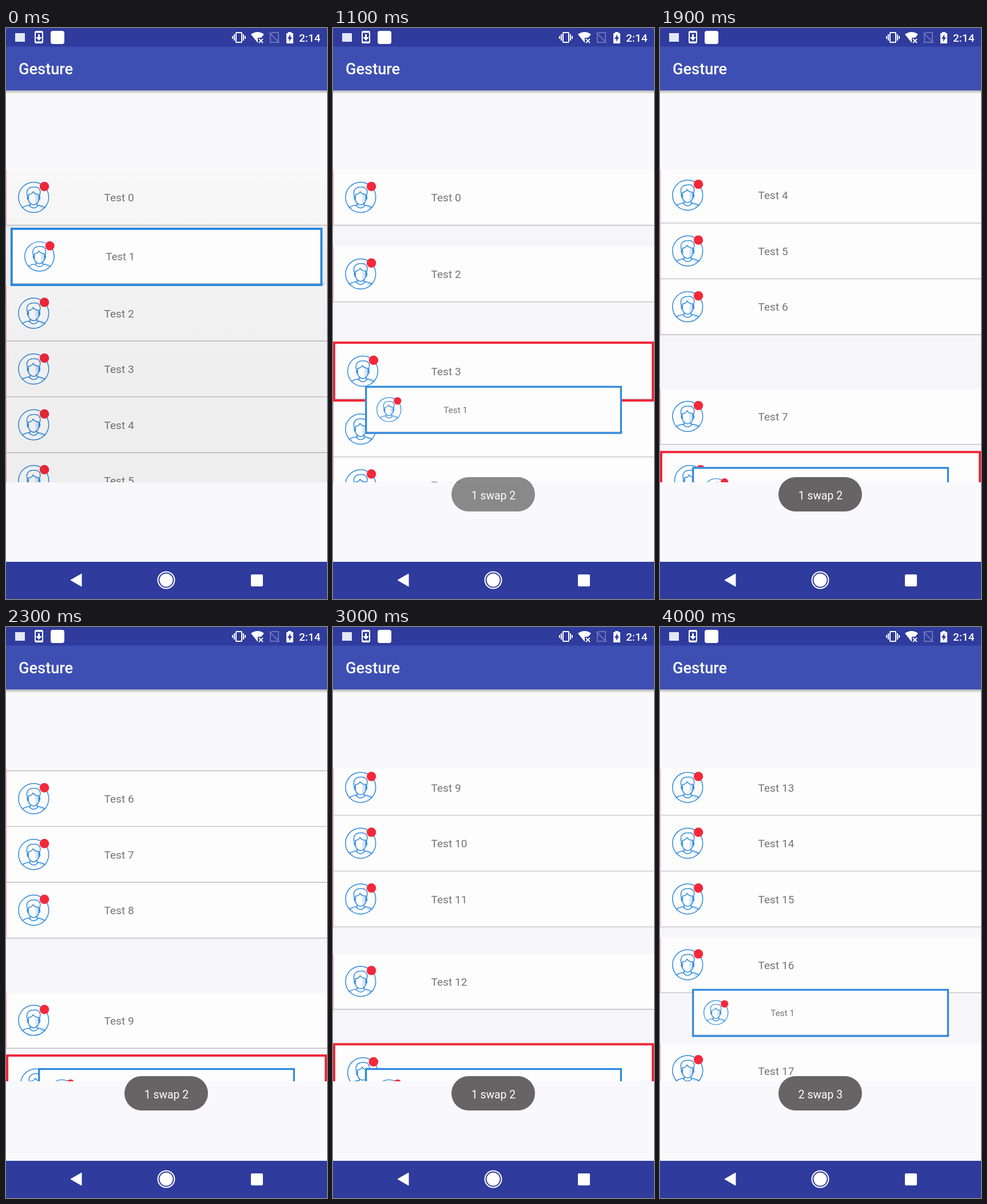
An HTML page that plays this animation: 561x998 px, repeating every 4100 ms.

```html
<!DOCTYPE html>
<html lang="en">
<head>
<meta charset="utf-8">
<title>Drag to reorder</title>
<style>
  html, body { margin: 0; height: 100%; overflow: hidden; }
  svg { display: block; width: 561px; height: 998px; background: #f9f8fa; }
  text { font: 19.1px Roboto, sans-serif; }
  .title { font-size: 27.2px; font-weight: 500; fill: #fff; }
  .clock { font-weight: 500; fill: #fff; }
  .label { fill: #757575; }
  .bg { fill: #fdfdfe; width: 561px; height: 97.5px; }
  .frame { fill: none; stroke: #f1283a; stroke-width: 4px; visibility: hidden; }
  .hot .bg { height: 105px; }
  .hot .frame { visibility: visible; }
  .hot .edge { visibility: hidden; }
  .hot .body { transform: translate(3.75px, 3.75px); }
  .hot .label { transform: translateY(3.75px); }
  #drag .frame { stroke: #2b87dd; }
</style>
</head>
<body>
<svg viewBox="0 0 561 998">
  <defs>
    <clipPath id="view"><path d="M0 248H561V794H0z"/></clipPath>
    <linearGradient id="drop" x2="0" y2="1">
      <stop stop-color="#000" stop-opacity=".3"/>
      <stop offset="1" stop-color="#000" stop-opacity="0"/>
    </linearGradient>
    <linearGradient id="dim" x2="0" y2="1">
      <stop stop-opacity=".02"/>
      <stop offset=".6" stop-opacity=".055"/>
      <stop offset="1" stop-opacity=".06"/>
    </linearGradient>
    <g id="avatar">
      <g fill="none" stroke="#2f89dc" stroke-width="1.5" stroke-linecap="round" stroke-linejoin="round">
        <path d="M9 14Q17 15 20 18L15 22Q11 19 9 14zM3-4H8V5Q7 10 3 12z" fill="#d3e6fa" stroke="none"/>
        <circle r="26.4"/>
        <path d="M-10 1C-12-4-13-10-10-14-7-18-3-18 0-18 9-19 13-13 11-6L10 1"/>
        <path d="M-9-5Q-3-5-1-10 2-5 9-5V4C9 9 4 13 0 13S-9 9-9 4z"/>
        <path d="M-9-1q-3 0-2 3t2 3M9-1q3 0 2 3t-2 3"/>
        <path d="M-20 18Q-14 14-6 13.5V10M20 18Q14 14 6 13.5V10M-8 14Q0 23 8 14"/>
      </g>
      <circle cx="18.8" cy="-19" r="8.2" fill="#f4283a"/>
    </g>
  </defs>

  <g clip-path="url(#view)">
    <path d="M0 248H561V794H0z" fill="#f6f6f8"/>
    <g id="rows"></g>
    <path id="shade" d="M0 248H561V794H0z" fill="url(#dim)"/>
    <g id="drag"></g>
  </g>

  <path d="M0 109H561V115H0z" fill="url(#drop)"/>
  <path d="M0 32H561V109H0z" fill="#3e4fb3"/>
  <path d="M0 0H561V32.500H0zM0 933H561V998H0z" fill="#2f3b9d"/>
  <text class="title" x="22" y="81">Gesture</text>
  <text class="clock" x="512" y="24">2:14</text>

  <g fill="#fff">
    <rect x="16" y="9" width="17" height="15" fill="#e4e7f5"/>
    <rect x="78" y="5" width="24" height="23" rx="4"/>
    <path d="M56 11h3v5h4l-5.500 6-5.500-6h4z"/>
    <path d="M428 11Q440 3 451 11L446 17H440V26z"/>
    <path d="M442 19l7 7m0-7l-7 7" stroke="#fff" stroke-width="1.800"/>
    <path d="M493 7h6v2h3v18h-12V9h3z"/>
    <path d="M497 11l-5 8h3v5l5-8h-3z" fill="#2f3b9d"/>
    <path d="M113 965L132 954V976z" stroke="#fff" stroke-linejoin="round"/>
    <circle cx="280" cy="965" r="11.500"/>
    <rect x="428" y="955" width="21" height="21" rx="2"/>
  </g>
  <g fill="none" stroke="#fff" stroke-width="2">
    <rect x="51" y="6" width="13" height="20" rx="2"/>
    <path d="M51 7.500H64M51 24.500H64"/>
    <rect x="402" y="8" width="10" height="17" rx="1"/>
    <path d="M399 11V22M415 11V22M396 14V19M418 14V19"/>
    <path d="M465 8H476V25H462V12zM460 8L478 26" stroke="#6973b8"/>
    <circle cx="280" cy="965" r="14.500"/>
  </g>

  <g id="toast">
    <rect x="207" y="785" width="146" height="60" rx="30" fill="#666465"/>
    <text id="note" x="280.500" y="823.500" text-anchor="middle" fill="#fff" style="font-size:19.4px"></text>
  </g>
</svg>
<script>
const LOOP = 4100, STEP = 100, MOVE = 250;
const TOP = 248, PITCH = 97.5, PAD = 7.5, COUNT = 20;
const $ = id => document.getElementById(id);

// [input, value] pairs, linear in between
const centerPath = [[0, 400], [200, 402], [700, 478], [950, 600], [1150, 690], [1335, 762],
  [1500, 805.5], [2300, 813], [3000, 813], [3600, 802], [3830, 742], [4000, 674.5]];
const scrollPath = [[1267, 0], [1500, 109.2], [2300, 483.5], [3000, 795.7], [3600, 1076.5], [3830, 1185.7]];
const swapPath = [[2, 950], [3, 1150], [4, 1335], [5, 1446], [9, 2250], [12, 2866], [15, 3533], [16, 3817], [17, 9000]];
const scalePath = [[0, .972], [200, .8]];
const toastPath = [[950, 0], [1150, 1], [3050, 1], [3200, 0], [3300, 0], [3500, 1]];

function at(points, x) {
  if (x <= points[0][0]) return points[0][1];
  for (let i = 1; i < points.length; i++) {
    const [x0, y0] = points[i - 1], [x1, y1] = points[i];
    if (x < x1) return y0 + (y1 - y0) * (x - x0) / (x1 - x0);
  }
  return points[points.length - 1][1];
}

const rowMarkup = k => `
  <rect class="bg"/>
  <path class="edge" d="M.5 0V97" stroke="#ff9aa3"/>
  <g class="body">
    <use href="#avatar" x="48.3" y="48"/>
    <path d="M0 96.8H561" stroke="#bdbdc0" stroke-width="1.4"/>
  </g>
  <text class="label" x="171.5" y="55.3">Test ${k}</text>
  <rect class="frame" x="2" y="2" width="557" height="101"/>`;

const rows = [];
for (let k = 0; k < COUNT; k++) {
  if (k === 1) continue;
  const g = document.createElementNS("http://www.w3.org/2000/svg", "g");
  g.innerHTML = rowMarkup(k);
  $("rows").append(g);
  rows.push({ k, g, swap: k ? at(swapPath, k) : Infinity });
}
$("drag").innerHTML = rowMarkup(1);
$("drag").setAttribute("class", "hot");

function draw(t) {
  const scroll = at(scrollPath, t), center = at(centerPath, t), scale = at(scalePath, t);
  const moving = rows.filter(r => t > r.swap && t < r.swap + MOVE).length;
  const next = rows.find(r => r.k > 1 && t < r.swap).k;
  const slot = k => TOP + PITCH * k - scroll;
  const extra = moving > 1 ? PAD : 0;
  const hot = center > slot(next) + PAD + extra;

  for (const { k, g, swap } of rows) {
    let y = slot(k);
    if (k && t >= swap) {
      const p = Math.min(1, (t - swap) / MOVE);
      y = slot(k - 1) + (PITCH + PAD) * (1 + Math.cos(Math.PI * p)) / 2;
    } else if (k) {
      y += PAD + extra + (hot && k > next ? PAD : 0);
    }
    g.setAttribute("transform", `translate(0 ${y})`);
    g.setAttribute("class", hot && k === next ? "hot" : "");
  }

  $("drag").setAttribute("transform", `translate(280.5 ${center}) scale(${scale}) translate(-280.5 -52.5)`);
  $("shade").style.opacity = t < 200 ? 1 : 0;
  $("toast").style.opacity = at(toastPath, t);
  $("note").textContent = t < 3250 ? "1 swap 2" : "2 swap 3";
}

const start = performance.now();
function tick() {
  const t = (performance.now() - start) % LOOP;
  draw(Math.floor(t / STEP) * STEP);
  requestAnimationFrame(tick);
}
tick();
</script>
</body>
</html>
```
